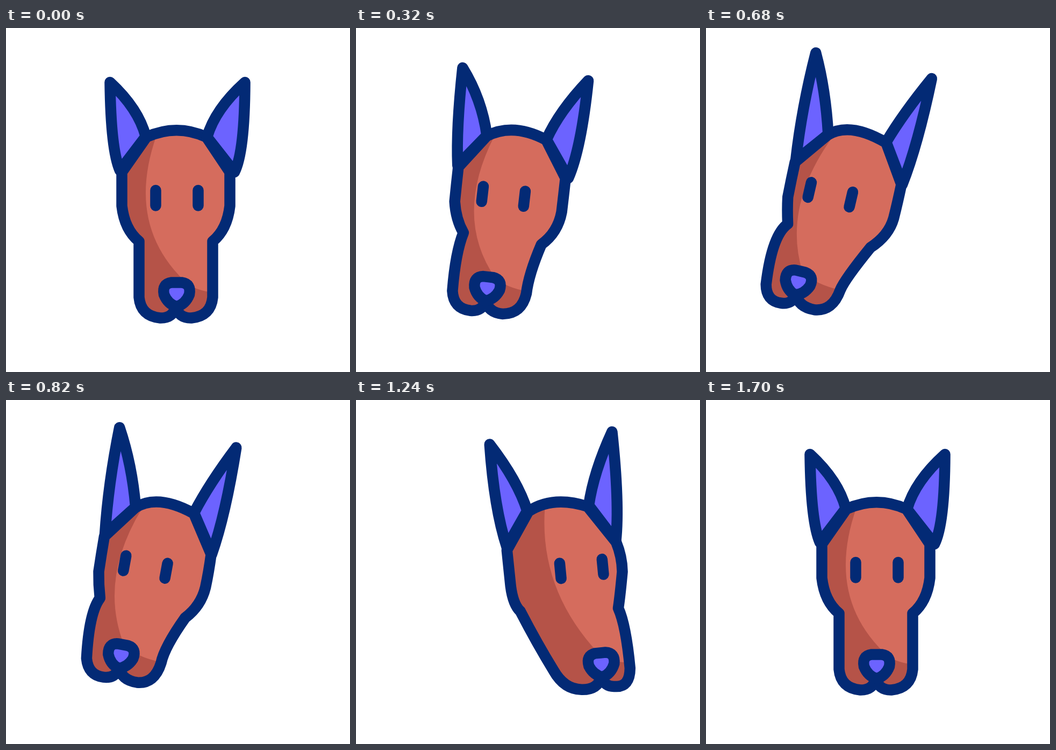
An HTML page with a canvas for the animation above (2400 ms loop, 640 by 640 pixels).

```html
<!DOCTYPE html>
<html lang="en">
<head>
<meta charset="utf-8">
<title>Dog head</title>
<style>
html, body { margin: 0; width: 100%; height: 100%; overflow: hidden; background: #fff; }
canvas { display: block; width: 100vmin; height: 100vmin; }
</style>
</head>
<body>
<canvas id="stage" width="640" height="640"></canvas>
<script>
const ctx = document.getElementById('stage').getContext('2d');
const NAVY = '#032a75', COAT = '#d56c5d', SHADE = '#b55348', VIOLET = '#6c63ff';
const LOOP = 2400;

// Continue half an outline with its mirror image; sum is twice the axis
function mirror(half, sum) {
  const all = [...half];
  for (let i = half.length - 4; i >= 0; i -= 2) all.push(sum - half[i], half[i + 1]);
  return all;
}

// Rotate a rigid part about a centre and move that centre
function turn(pts, [cx, cy], [x, y], deg) {
  const c = Math.cos(deg * Math.PI / 180), s = Math.sin(deg * Math.PI / 180);
  return pts.map((v, i) => i % 2
    ? y + (pts[i - 1] - cx) * s + (v - cy) * c
    : x + (v - cx) * c - (pts[i + 1] - cy) * s);
}

// Each part facing front, left and right, as quadratic curves
const jaw = [215.5,268, 215.5,300, 215.5,331, 220.6,375, 247.5,397, 247.5,449,
  247.5,501, 250.8,536, 287,539.5, 311,540, 316,518];
const sides = [
  mirror(jaw, 632),
  [167,250, 160,283, 154,315, 153,339, 155.5,366, 127,388, 116,478, 116,509,
   144,513, 165,516, 172,497, 177,520, 206,525, 240,528, 254,488, 262,467,
   308,408, 342,386, 351,353, 358,324, 365,290],
  [277,278, 280,311, 283,345, 287,378, 299,391, 328,449, 358,502, 377,536,
   409,537, 439,538, 446,513, 451,533, 472,532, 499,534, 500,498, 493,420,
   482,388, 486,366, 490.5,321, 490.5,293, 480,266]
];
const brow = [
  [373,203, 317.7,177.5, 261,203],
  [336,213, 269.5,174, 227,199],
  [428,199, 363,177, 318,207]
];
const shade = [
  [280,200, 220,370, 340,478, 356,488, 385,492],
  [236,203, 144,334, 185,455, 209,478, 255,488],
  [348,200, 334,350, 440,470, 459,486, 500,489]
];
const earLeft = [
  [193.5,101, 246.6,150, 260,202, 212,265, 195,227],
  [203,49, 223,117, 228,198, 168,247, 178,152],
  [249,79, 299,148, 316,206, 277,272, 255.5,197]
];
const earRight = [
  [444.5,101, 389,151, 374,203, 425,268, 444,231],
  [420.5,95, 367,159, 336,212, 367,290, 395.6,219],
  [474.5,59, 440,135, 430,197, 479,264, 487,193]
];
const eye = [278.5,302, 278.5,330.5, 357.5,302, 357.5,330.5];
const eyes = [
  eye,
  turn(eye, [318, 316], [233.7, 310.2], 12.6),
  turn(eye, [318, 316], [413.2, 313.5], -4.6)
];
const snout = mirror([317.5,473.5, 322,473.5, 327,473.5, 345,476, 341,496,
  334,513.6, 317.5,518.5], 635);
const nose = [
  snout,
  turn(snout, [317.5, 495], [175.3, 474.5], 12.6),
  turn(snout, [317.5, 495], [446, 490.5], -4.6)
];

// The turned views sit just short of the full swing; extend them to it
function extend([front, left, right]) {
  const l = front.map((v, i) => v + (left[i] - v) / 0.942);
  const r = right.map((v, i) => (v - 0.065 * l[i]) / 0.935);
  return [front, l, r];
}
const parts = { sides, brow, shade, earLeft, earRight, eyes, nose };
for (const k in parts) parts[k] = extend(parts[k]);

// cubic-bezier(x1, 0, x2, 1)
function ease(x, x1, x2) {
  let lo = 0, hi = 1;
  for (let i = 0; i < 30; i++) {
    const s = (lo + hi) / 2, u = 1 - s;
    if (3 * x1 * s * u * u + 3 * x2 * s * s * u + s * s * s < x) lo = s; else hi = s;
  }
  return lo * lo * (3 - 2 * lo);
}

const moves = [
  { start: 0, end: 600, from: 0, to: 1, x1: 0.54, x2: 0.57 },
  { start: 600, end: 1130, from: 1, to: 2, x1: 0.8, x2: 0.45 },
  { start: 1130, end: 1700, from: 2, to: 0, x1: 0.5, x2: 0.55 }
];

function poseAt(t) {
  const m = moves.find(m => t < m.end);
  if (!m) return k => parts[k][0];
  const p = ease((t - m.start) / (m.end - m.start), m.x1, m.x2);
  return k => parts[k][m.from].map((v, i) => v + (parts[k][m.to][i] - v) * p);
}

// Runs of curves joined by straight lines
function path(...runs) {
  const p = new Path2D();
  runs.forEach((r, n) => {
    p[n ? 'lineTo' : 'moveTo'](r[0], r[1]);
    for (let i = 2; i < r.length; i += 4) p.quadraticCurveTo(...r.slice(i, i + 4));
  });
  return p;
}

function closed(...runs) {
  const p = path(...runs);
  p.closePath();
  return p;
}

function fill(p, color) {
  ctx.fillStyle = color;
  ctx.fill(p);
}

function draw(t) {
  const get = poseAt(t);
  const face = closed(get('sides'), get('brow'));
  const ears = ['earLeft', 'earRight'].map(k => {
    const e = get(k);
    return closed(e.slice(0, 6), [...e.slice(6), e[0], e[1]]);
  });
  const tip = closed(get('nose'));
  const edge = get('shade');
  const lids = get('eyes');

  ctx.fillStyle = '#fff';
  ctx.fillRect(0, 0, 640, 640);
  fill(face, COAT);
  ctx.save();
  ctx.clip(face);
  fill(closed(edge, [640, edge[9]], [640, 640], [0, 640], [0, 150]), SHADE);
  ctx.restore();
  ears.forEach(e => fill(e, VIOLET));

  ctx.strokeStyle = NAVY;
  ctx.lineWidth = 20.5;
  ctx.lineCap = ctx.lineJoin = 'round';
  ctx.stroke(face);
  ears.forEach(e => ctx.stroke(e));
  fill(tip, VIOLET);
  ctx.stroke(tip);
  ctx.stroke(path(lids.slice(0, 2), lids.slice(2, 4)));
  ctx.stroke(path(lids.slice(4, 6), lids.slice(6)));
}

const begin = performance.now();
function tick() {
  draw((performance.now() - begin) % LOOP);
  requestAnimationFrame(tick);
}
tick();
</script>
</body>
</html>
```
